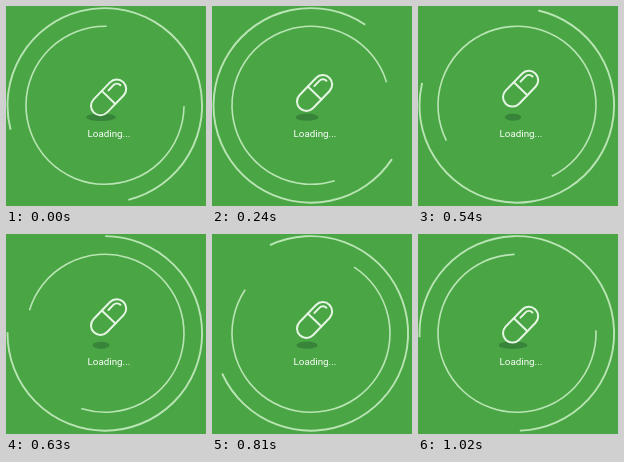
Animation, 200 px wide and 200 px high, one loop 1.05 s. Source, as an HTML page:

```html
<!DOCTYPE html>
<html lang="en">
<head>
<meta charset="utf-8">
<title>Loading</title>
<style>
  html, body { margin: 0; width: 100%; height: 100%; overflow: hidden; background: #4aa544; }
  svg { display: block; width: 100vw; height: 100vh; }
  .ring { fill: none; stroke: #b9e5b5; stroke-dasharray: 270.5 89.5; }
  .pill { fill: none; stroke: #e6f6e4; stroke-width: 2; stroke-linecap: round; }
  text { font: 9.8px Roboto, "Liberation Sans", sans-serif; fill: #fbfffb; }
</style>
</head>
<body>
<svg viewBox="0 0 200 200">
  <g transform="translate(98.8 99.4)">
    <circle id="outer" class="ring" r="97.3" pathLength="360" stroke-width="1.9"/>
  </g>
  <g transform="translate(99 99.3)">
    <circle id="inner" class="ring" r="79" pathLength="360" stroke-width="1.6"/>
  </g>
  <ellipse id="shadow" cx="95" cy="111.2" rx="14.8" ry="3.8" fill="#37843a"/>
  <g id="bob">
    <g class="pill" transform="translate(102.6 91.4) rotate(-46)">
      <rect x="-21.2" y="-9.4" width="42.4" height="18.8" rx="9.4"/>
      <path d="M0-9.4V9.4M5-5H12A5 5 0 0 1 17 0"/>
    </g>
  </g>
  <text x="81.6" y="131.4">Loading...</text>
</svg>
<script>
  const LOOP = 1050, STEP = 30;
  const times = [0, 240, 420, 540, 720, 900, 1020, LOOP];
  const outerTurn = [0, -132, -216, -242.7, -266.7, -300.7, -347.8, -360];
  const innerTurn = [0, 71.9, 125.5, 152.7, 248.2, 344.9, 357.1, 360];
  const lift = [0, -4.4, -7.3, -8.7, -7.2, -3.3, -0.7, 0];

  // Periodic cubic curve through the given poses.
  function curve(values) {
    const n = times.length - 1;
    const span = i => times[i + 1] - times[i];
    const slope = i => (values[i + 1] - values[i]) / span(i);
    const tangent = i => {
      const a = (i + n - 1) % n, b = i % n;
      return (slope(a) * span(b) + slope(b) * span(a)) / (span(a) + span(b));
    };
    return t => {
      let i = 0;
      while (i < n - 1 && t >= times[i + 1]) i++;
      const h = span(i), u = (t - times[i]) / h, v = 1 - u;
      return values[i] * v * v * (1 + 2 * u) + values[i + 1] * u * u * (3 - 2 * u)
        + h * u * v * (tangent(i) * v - tangent(i + 1) * u);
    };
  }

  const outerAt = curve(outerTurn), innerAt = curve(innerTurn), liftAt = curve(lift);
  const [outer, inner, shadow, bob] =
    ["outer", "inner", "shadow", "bob"].map(id => document.getElementById(id));
  const start = performance.now();

  function draw() {
    const elapsed = performance.now() - start;
    const t = Math.floor(elapsed % LOOP / STEP) * STEP;
    const y = liftAt(t);
    outer.setAttribute("transform", `rotate(${165.5 + outerAt(t)})`);
    inner.setAttribute("transform", `rotate(${0.7 + innerAt(t)})`);
    bob.setAttribute("transform", `translate(0 ${y})`);
    shadow.setAttribute("rx", 14.8 + 0.77 * y);
    shadow.setAttribute("ry", 3.8 + 0.04 * y);
    requestAnimationFrame(draw);
  }
  draw();
</script>
</body>
</html>
```
